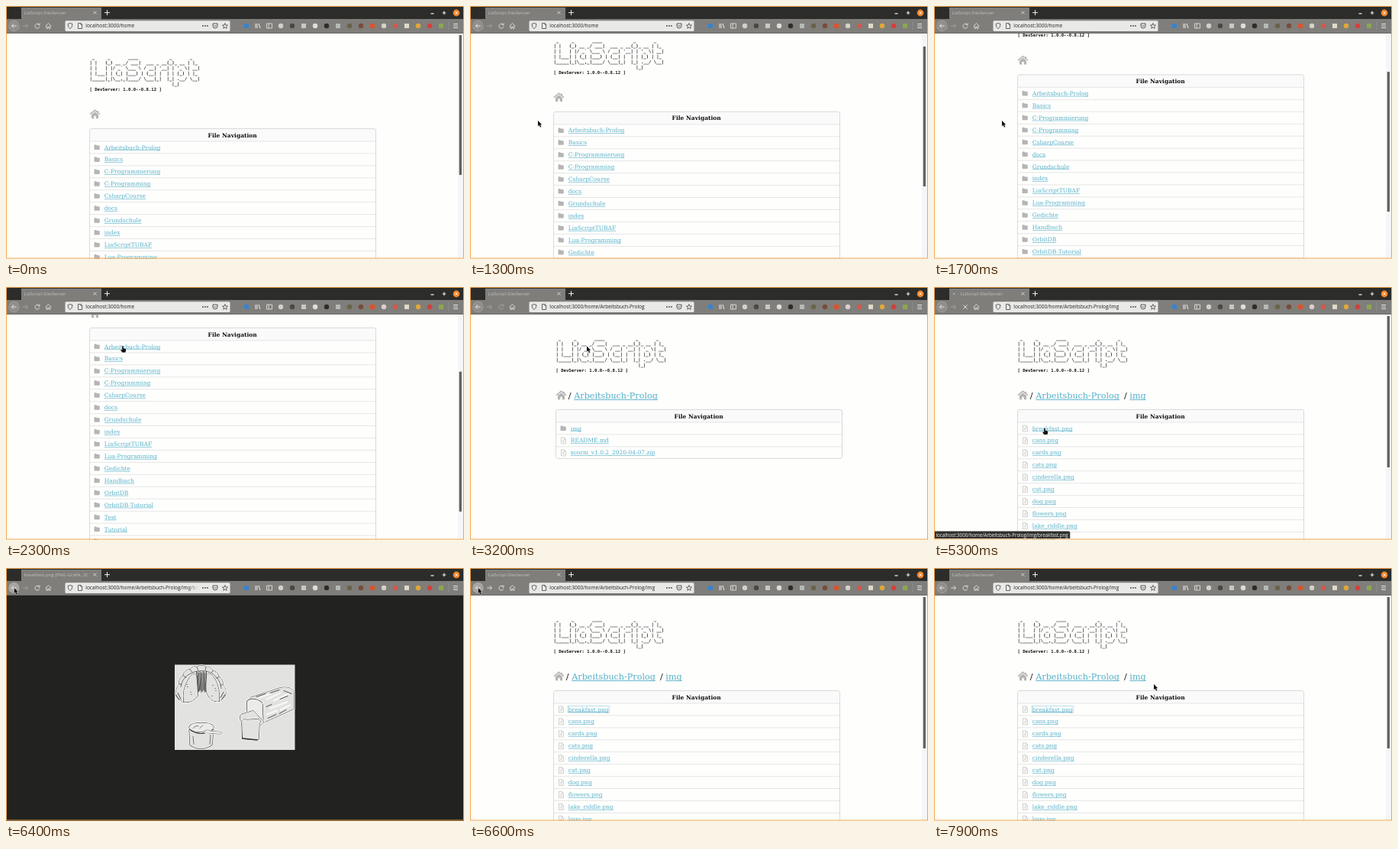
An HTML page with a canvas that plays this animation: 600x331 px, repeating every 8 s.

```html
<!DOCTYPE html>
<html lang="en">
<head>
<meta charset="utf-8">
<title>File navigation</title>
<style>
html, body { margin: 0; width: 100%; height: 100%; overflow: hidden; }
canvas { display: block; width: 600px; height: 331px; }
</style>
</head>
<body>
<canvas id="stage" width="600" height="331"></canvas>
<script>
const ctx = document.getElementById('stage').getContext('2d');
const LOOP = 8000, STEP = 100, ROW = 15.94;
const SANS = '"Open Sans", "Noto Sans", sans-serif';
const SERIF = '"DejaVu Serif", serif';
const MONO = '"DejaVu Sans Mono", monospace';
const LINK = '#55b0c8', ICON = '#b5b5b5', LIGHT = '#dededb', DIM = '#a3a29f', CHROME = '#7f7e7b';

const LOGO = [
  ' _     _       ____            _       _',
  '| |   (_) __ _/ ___|  ___ _ __(_)_ __ | |_',
  "| |   | |/ _` \\___ \\ / __| '__| | '_ \\| __|",
  '| |___| | (_| |___) | (__| |  | | |_) | |_',
  '|_____|_|\\__,_|____/ \\___|_|  |_| .__/ \\__|',
  '                                |_|',
  '[ DevServer: 1.0.0--0.8.12 ]'
];

const ROOT = 'localhost:3000/home', BOOK = '/Arbeitsbuch-Prolog';
const PAGES = {
  home: {
    path: '', x: 109.5, thumb: 183, crumbs: [],
    rows: ['Arbeitsbuch-Prolog', 'Basics', 'C-Programmierung', 'C-Programming', 'CsharpCourse',
      'docs', 'Grundschule', 'index', 'LiaScriptTUBAF', 'Lua-Programming', 'Gedichte', 'Handbuch',
      'OrbitDB', 'OrbitDB-Tutorial', 'Test', 'Tutorial', '']
  },
  book: {
    path: BOOK, x: 112.5, thumb: 0, crumbs: ['Arbeitsbuch-Prolog'],
    rows: ['img', 'README.md', 'scorm_v1.0.2_2020-04-07.zip']
  },
  img: {
    path: BOOK + '/img', x: 109.5, thumb: 198, crumbs: ['Arbeitsbuch-Prolog', 'img'],
    rows: ['breakfast.png', 'cans.png', 'cards.png', 'cats.png', 'cinderella.png', 'cut.png',
      'dog.png', 'flowers.png', 'lake_riddle.png', 'logo.jpg', '']
  },
  picture: { path: BOOK + '/img/breakfast.png' }
};

// Pointer stops: time, x, y
const POINTER = [
  [500, 121, 128], [700, 89, 150], [1700, 89, 150], [2300, 153, 77.5], [3300, 153, 77.5],
  [3700, 138, 193], [3800, 138, 193], [4100, 140, 186], [4300, 140, 186], [4500, 145, 185],
  [5700, 145, 185], [6300, 10.7, 26], [7200, 10.7, 26], [7900, 288, 152]
];

const within = (t, a, b) => t >= a && t < b;
const clamp = v => Math.max(0, Math.min(1, v));

function pointerAt(t) {
  if (t < POINTER[0][0]) return null;
  const next = POINTER.findIndex(p => p[0] > t);
  if (next < 0) return POINTER[POINTER.length - 1].slice(1);
  const [t0, x0, y0] = POINTER[next - 1], [t1, x1, y1] = POINTER[next];
  const k = (t - t0) / (t1 - t0), e = k * k * (3 - 2 * k);
  return [x0 + (x1 - x0) * e, y0 + (y1 - y0) * e];
}

function stateAt(t) {
  const page = t < 2700 ? 'home' : t < 4700 ? 'book' : within(t, 5700, 6500) ? 'picture' : 'img';
  const hover = within(t, 2400, 2800) ? BOOK
    : within(t, 4300, 4700) ? BOOK + '/img'
    : within(t, 5000, 5700) ? BOOK + '/img/breakfast.png' : '';
  return {
    t, page, hover,
    scroll: page === 'home' && t >= 1200 ? 10 + 97 * clamp((t - 1200) / 800) : 0,
    loading: within(t, 2500, 3200) || within(t, 4400, 5000) || within(t, 5300, 5700),
    reloadDim: within(t, 3200, 3500),
    hand: within(t, 2200, 2800) || within(t, 4000, 5700),
    pointer: pointerAt(t)
  };
}

function rect(x, y, w, h, color) {
  ctx.fillStyle = color;
  ctx.fillRect(x, y, w, h);
}

function round(x, y, w, h, r, fill, stroke) {
  ctx.beginPath();
  ctx.roundRect(x, y, w, h, r);
  if (fill) { ctx.fillStyle = fill; ctx.fill(); }
  if (stroke) { ctx.strokeStyle = stroke; ctx.lineWidth = 1; ctx.stroke(); }
}

function disc(x, y, r, color) {
  ctx.beginPath();
  ctx.arc(x, y, r, 0, 7);
  ctx.fillStyle = color;
  ctx.fill();
}

function shape(d, x, y, fill, stroke, width = 1) {
  const path = new Path2D(d);
  ctx.save();
  ctx.translate(x, y);
  if (stroke) { ctx.strokeStyle = stroke; ctx.lineWidth = width; ctx.stroke(path); }
  if (fill) { ctx.fillStyle = fill; ctx.fill(path); }
  ctx.restore();
}

function text(s, x, y, font, color) {
  ctx.font = font;
  ctx.fillStyle = color;
  ctx.fillText(s, x, y);
  return ctx.measureText(s).width;
}

function link(s, x, y, size) {
  const w = text(s, x, y, `${size}px ${SERIF}`, LINK);
  rect(x, y + size * 0.13, w, size * 0.08, LINK);
  return w;
}

function homeIcon(x, y, color) {
  shape('M0 6 L6.5 0.6 L13 6 M10.3 1.2 V3.5', x, y, null, color, 1.5);
  shape('M2 6.4 L6.5 2.7 L11 6.4 V11.5 H7.8 V8 H5.2 V11.5 H2Z', x, y, color);
}

function rowIcon(name, x, y) {
  if (name.includes('.')) {
    shape('M.5 .5 H4.3 L6.5 2.7 V8.5 H.5Z M4.3 .5 V2.7 H6.5 M2 4.3 H5 M2 6.2 H5', x + 6.5, y - 4.5, null, '#c3c3c3', 0.8);
  } else {
    shape('M0 1 Q0 0 1 0 H2.6 L3.6 1 H6.4 Q7.3 1 7.3 2 V5.5 Q7.3 6.5 6.4 6.5 H1 Q0 6.5 0 5.5Z', x + 6, y - 3.5, ICON);
  }
}

function drawTable(page, focused) {
  const { x, rows } = page;
  round(x, 160.5, 375, 16.5, [2.5, 2.5, 0, 0], '#f9faf9');
  ctx.textAlign = 'center';
  text('File Navigation', x + 187.2, 171.6, `bold 7.5px ${SERIF}`, '#111');
  ctx.textAlign = 'left';
  rows.forEach((name, i) => {
    const y = 185 + i * ROW;
    rect(x, y - 8.5, 375, 1, '#e6e6e6');
    rowIcon(name, x, y);
    link(name, x + 19.3, y + 2.5, 7.5);
  });
  round(x, 160.5, 375, 16 + rows.length * ROW, 2.5, null, '#dadada');
  if (focused) {
    ctx.setLineDash([1, 1]);
    ctx.strokeStyle = LINK;
    ctx.lineWidth = 0.8;
    ctx.strokeRect(x + 18.8, 180.5, 54, 8.8);
    ctx.setLineDash([]);
  }
}

function drawListing(state) {
  const page = PAGES[state.page], { x } = page;
  rect(0, 36, 600, 295, '#fefefd');
  ctx.save();
  ctx.translate(0, -state.scroll);
  LOGO.forEach((line, i) => text(line, x, 68.8 + i * 7, `bold 5.6px ${MONO}`, '#111'));
  homeIcon(x + 0.5, 135.7, ICON);
  let cx = x + 16.3;
  for (const crumb of page.crumbs) {
    text('/', cx, 145.6, `11.2px ${SERIF}`, '#111');
    cx += 7.4;
    cx += link(crumb, cx, 145.6, 11.2) + 6;
  }
  drawTable(page, state.t >= 6500);
  ctx.restore();
  if (page.thumb) {
    rect(592, 36, 7, 294, '#f5f5f4');
    rect(593.7, 38 + state.scroll * 0.68, 3.2, page.thumb, '#5f5f5f');
  }
}

function drawPicture() {
  const ink = '#2b2b2b', base = '#e2e2e1', pale = '#ebebea';
  rect(0, 36, 600, 295, '#222220');
  rect(221, 126.5, 157.5, 111.5, base);
  ctx.save();
  ctx.translate(221, 126.5);
  ctx.lineJoin = ctx.lineCap = 'round';
  // Ink line with a white halo
  const draw = (d, fill, width = 0.8) => {
    shape(d, 0, 0, null, '#f8f8f8', width + 1.8);
    shape(d, 0, 0, fill, ink, width);
  };
  const scratch = (d, width = 0.6) => shape(d, 0, 0, null, ink, width);

  // Plaited pastry
  draw('M12 49 Q2 46 1 37 Q2 30 6 25 Q5 18 11 14 Q12 7 20 6 Q23 1 29 3 Q35 -1 41 3 Q48 2 50 8 Q57 9 58 16 Q64 20 63 26 Q68 31 67 38 Q66 44 58 48', base);
  scratch('M8 29 Q9 19 18 13 Q26 8 35 8 Q48 8 55 17 Q60 22 61 31 M6 25 L9 26 M11 14 L15 17 M20 6 L23 10 M29 3 L31 8 M41 3 L40 8 M50 8 L47 12 M58 16 L54 18 M63 26 L60 27');
  draw('M12 49 Q9 32 19 17 Q25 9 29 14 Q32 30 30 41 Q25 50 12 49Z', base, 1);
  draw('M58 48 Q60 32 53 19 Q47 9 42 13 Q40 27 42 37 Q47 50 58 48Z', base, 1);
  for (let i = 0; i < 10; i++) {
    scratch(`M${28.5 + i * 1.45} ${9 + i % 3} L${30.5 + i * 1.1} ${36 - i % 4}`, 0.75);
  }
  for (let i = 0; i < 8; i++) {
    disc((i % 2 ? 46 : 16) + i * 7 % 9, 26 + i * 5 % 17, 0.6, ink);
  }
  scratch('M2 40 L6 46 M4 37 L8 45 M62 45 L66 39 M60 43 L64 36', 0.8);

  // Loaf with slices
  draw('M99 43 L139 30 Q154 28 156 36 L156 58 L116 76', base, 0.9);
  draw('M95 66 L95 48 Q99 43 108 46 Q117 49 115 56 L116 76', pale, 1.3);
  shape('M111 43 L126 38 M121 45 L138 37 M130 47 L149 38 M125 57 L147 49 M121 65 L134 60 M139 59 L151 53', 0, 0, null, '#f8f8f8', 2.2);
  scratch('M107 42 L119 38 M125 37 L137 33 M122 70 L133 65 M143 34 L153 38 M137 64 L146 59 M120 55 L127 52 M138 45 L148 41', 0.8);
  draw('M91 78 Q82 70 87 65 L103 60 L116 74 Q117 79 110 79', base, 1);
  draw('M88 74 Q89 70 95 72 L109 71 Q114 72 111 78 L110 98 L89 97Z', base, 1);
  scratch('M89 96.5 L108 98.5', 1.6);

  // Pot and spoon
  draw('M19 82 L20 105 Q34 115 49 105 L51 82', base, 1.1);
  draw('M19 82 Q20 76 35 76 Q50 76 51 82 Q50 88 35 88 Q20 88 19 82Z', pale, 1.2);
  scratch('M20 85 Q34 95 50 85', 1.2);
  scratch('M24 83 Q27 79 31 80 M33 83 L37 79 M24 94 L25 104 M47 92 L46 104');
  draw('M39 87 Q43 84 47 87 L60 88 Q64 89 60 90.5 L46 89.5 Q41 90 39 87Z', pale);
  ctx.restore();
}

function drawTab(state) {
  const picture = state.page === 'picture';
  rect(0, 0, 600, 18, '#2c2c2a');
  rect(20, 2, 105, 16, CHROME);
  ctx.save();
  ctx.beginPath();
  ctx.rect(20, 1, picture ? 87 : 91, 17);
  ctx.clip();
  const title = picture ? 'breakfast.png (PNG-Grafik, 300 × 212 Pixel)' : 'LiaScript-DevServer';
  text(title, state.loading ? 34.5 : 23.5, 11, `6.1px ${SANS}`, '#c4c3bf');
  ctx.restore();
  if (state.loading) disc(26 + 2.5 * Math.sin(state.t / 130), 9, 1.1, '#bcbbb7');
  shape('M-2 -2 L2 2 M2 -2 L-2 2', 116.5, 8.7, null, '#dddcd8', 0.9);
  shape('M-3.5 0 H3.5 M0 -3.5 V3.5', 132.5, 8.7, null, '#f0f0ee', 1);
  shape('M-2 0 H2', 558.5, 10, null, '#eee', 1.3);
  shape('M-2.3 0 H2.3 M0 -2.3 V2.3', 574, 9, null, '#eee', 1.2);
  disc(590, 9, 4.4, '#f0872e');
  shape('M-1.6 -1.6 L1.6 1.6 M1.6 -1.6 L-1.6 1.6', 590, 9, null, '#fff', 1);
}

function drawAddress(state) {
  round(77.5, 19.2, 216, 13.8, 1.5, '#e9e9e7');
  shape('M0 -3.5 L3 -2.5 Q3 2 0 3.7 Q-3 2 -3 -2.5Z', 84, 26, null, '#555', 0.9);
  shape('M-2.5 -3.5 H1 L2.7 -1.7 V3.5 H-2.5Z M1 -3.5 V-1.7 H2.7', 97, 26, null, '#555', 0.9);
  ctx.save();
  ctx.beginPath();
  ctx.rect(100, 18, 152, 16);
  ctx.clip();
  text(ROOT + PAGES[state.page].path, 104.3, 28.3, `6.5px ${SANS}`, '#222');
  if (state.page === 'picture') {
    const fade = ctx.createLinearGradient(238, 0, 252, 0);
    fade.addColorStop(0, 'rgba(233,233,231,0)');
    fade.addColorStop(1, '#e9e9e7');
    rect(238, 20, 14, 12, fade);
  }
  ctx.restore();
  [258, 261, 264].forEach(x => disc(x, 26, 0.9, '#444'));
  shape('M-3 -3 H3 V0 Q3 3 0 3 Q-3 3 -3 0Z M-1.5 -.8 L0 .8 L1.5 -.8', 274, 26, null, '#444', 0.9);
  shape('M0 -3.5 L1 -1 L3.6 -.9 L1.6 .8 L2.2 3.3 L0 1.9 L-2.2 3.3 L-1.6 .8 L-3.6 -.9 L-1 -1Z', 287, 26, null, '#444', 0.8);
}

function drawExtensions() {
  disc(315, 26, 3.2, '#3484cf');
  shape('M-3 -3 V3 M-1 -3 V3 M1 -3 L3 3', 330, 26, null, LIGHT, 1.1);
  shape('M-3.5 -3 H3.5 V3 H-3.5Z M-.8 -3 V3', 345, 26, null, LIGHT, 0.9);
  const colors = ['#d0d0ce', '#484846', '#c8c8c6', '#dededc', '#2c2c2a', '#b8b8b6', '#6b6248', '#7a4b3a',
    '#d9542b', '#d8cfcb', '#cf5a4c', '#e0dac6', '#e0a73a', '#d2413d', '#8aa852'];
  colors.forEach((color, i) => {
    const x = 360 + i * 15;
    if (i % 3 === 2) rect(x - 3, 23, 6, 6, color);
    else disc(x, 26, 3.2, color);
  });
  rect(579.5, 20, 0.7, 12, '#979693');
  shape('M-3 -2.5 H3 M-3 0 H3 M-3 2.5 H3', 589, 26, null, LIGHT, 1);
}

function drawToolbar(state) {
  rect(0, 17, 600, 19, CHROME);
  rect(0, 35.3, 600, 0.7, '#62615f');
  const p = state.pointer, overBack = p && p[0] < 18 && p[1] < 33;
  disc(10.5, 26, 7, overBack ? '#b6b5b2' : '#a8a7a4');
  disc(10.5, 26, 6.3, overBack ? '#a5a4a0' : '#8e8d8a');
  shape('M3.2 0 H-3 M-.3 -2.8 L-3.1 0 L-.3 2.8', 10.5, 26, null, '#e6e6e3', 1);
  shape('M-3.2 0 H3 M.3 -2.8 L3.1 0 L.3 2.8', 25.5, 26, null, state.t >= 6500 ? LIGHT : DIM, 1);
  if (state.loading) {
    shape('M-2.7 -2.7 L2.7 2.7 M2.7 -2.7 L-2.7 2.7', 41, 26, null, LIGHT, 1);
  } else {
    const color = state.reloadDim ? DIM : LIGHT;
    shape('M2.3 -1.8 A3 3 0 1 0 3 .8 M3 -3.5 V-1.2 H.7', 41, 26, null, color, 1);
  }
  shape('M-3.8 .2 L0 -3.4 L3.8 .2 M-2.6 -.5 V3.3 H-.7 V1 H.7 V3.3 H2.6 V-.5', 55.5, 26, null, LIGHT, 0.9);
  drawAddress(state);
  drawExtensions();
}

function drawStatus(path) {
  const s = ROOT + path;
  ctx.font = `6.2px ${SANS}`;
  round(0, 319.5, ctx.measureText(s).width + 5, 9.5, [0, 2, 0, 0], '#30302e');
  text(s, 2.5, 326.5, `6.2px ${SANS}`, '#f0f0ee');
}

function drawPointer([x, y], hand) {
  if (hand) {
    shape('M-.8 0 Q0 -.8 .8 0 V2.8 L3.6 3.6 Q4.3 4 4.1 5.4 L3.4 8 H-.8 L-2.8 5 Q-2.5 4 -.8 5Z', x, y, '#111', '#ddd', 0.7);
  } else {
    shape('M0 0 V7.2 L1.7 5.7 L3 8.7 L4.3 8.1 L3 5.3 H5.2Z', x, y, '#111', '#eee', 0.8);
  }
}

function drawFrame() {
  ctx.strokeStyle = '#f2a653';
  ctx.lineWidth = 1;
  ctx.strokeRect(0.5, 0.5, 599, 329.5);
}

function render(now) {
  const state = stateAt(Math.floor(now % LOOP / STEP) * STEP);
  if (state.page === 'picture') drawPicture();
  else drawListing(state);
  drawTab(state);
  drawToolbar(state);
  if (state.hover) drawStatus(state.hover);
  drawFrame();
  if (state.pointer) drawPointer(state.pointer, state.hand);
  requestAnimationFrame(render);
}

requestAnimationFrame(render);
</script>
</body>
</html>
```
